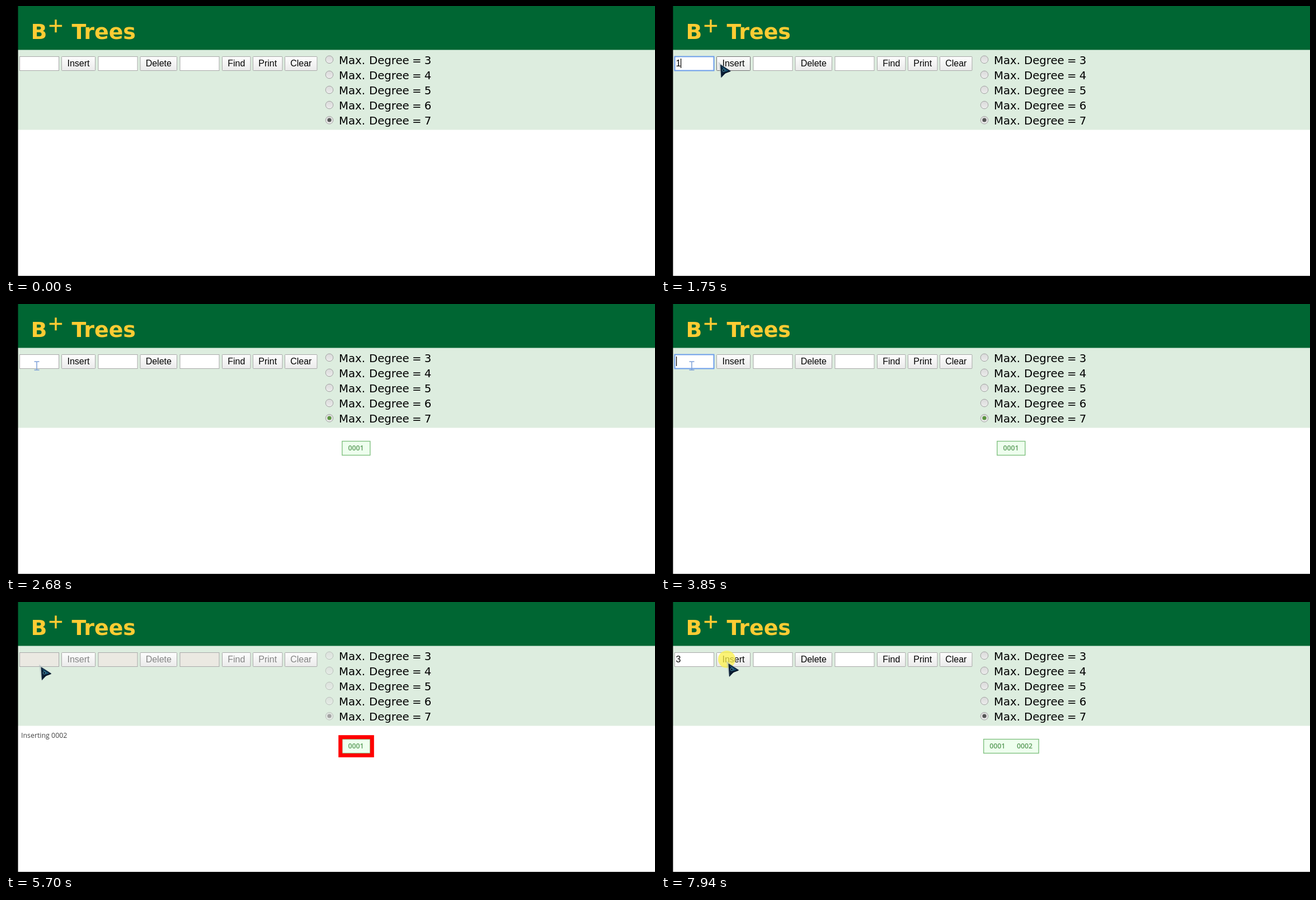
An HTML page for the animation above (8 s loop, 1160x483 px).

```html
<!DOCTYPE html>
<html lang="en">
<head>
<meta charset="utf-8">
<title>B+ Trees</title>
<style>
html, body { margin: 0; width: 100%; height: 100%; overflow: hidden; background: #fff; }
svg { display: block; width: 1160px; height: 483px; }
.title { font: bold 37.9px "DejaVu Sans", sans-serif; fill: #fc3; }
.plus { font: 35px "DejaVu Sans", sans-serif; fill: #fc3; stroke: #fc3; stroke-width: .5; }
.ui { font: 16px "Liberation Sans", Arial, sans-serif; }
.label { font: 19.7px "DejaVu Sans", sans-serif; }
.small { font: 12.4px "Open Sans", sans-serif; fill: #444; }
.key { font: 600 12.3px "Open Sans", sans-serif; fill: #5c9c5c; text-anchor: middle; }
</style>
</head>
<body>
<svg id="stage" viewBox="0 0 1160 483">
  <defs>
    <linearGradient id="face" x2="0" y2="1">
      <stop offset="0" stop-color="#fdfdfd"/><stop offset="1" stop-color="#ebebeb"/>
    </linearGradient>
    <linearGradient id="knob" x2="0" y2="1">
      <stop offset="0" stop-color="#dadada"/><stop offset="1" stop-color="#ececec"/>
    </linearGradient>
  </defs>
  <rect width="1160" height="483" fill="#fff"/>
  <rect y="482" width="1160" height="1" fill="#b4b4b4"/>
  <rect y="78" width="1160" height="143.5" fill="#ddeddf"/>
  <rect width="1160" height="78.5" fill="#063"/>
  <rect width="21.5" height="483" fill="#000"/>
  <text class="title" x="44.6" y="59">B</text>
  <text class="plus" x="74.3" y="46.5">+</text>
  <text class="title" x="117.6" y="59">Trees</text>
  <g id="form"></g>
  <g id="tree">
    <rect id="node" y="245.5" height="25" fill="#efe" stroke="#80c080" stroke-width="1.4"/>
    <text class="key" id="key1" y="261.7">0001</text>
    <text class="key" id="key2" x="650" y="261.7">0002</text>
  </g>
  <rect id="alert" x="597.7" y="241.7" width="56.6" height="32.6" fill="none" stroke="#f00" stroke-width="7"/>
  <text class="small" id="note" x="27" y="243.3"></text>
  <circle id="halo" r="15.5" fill="#fbf04a" fill-opacity=".75"/>
  <g id="arrow">
    <path d="M-1-1L20 14L10 20L3 27Z" fill="#a9b9bd" fill-opacity=".55"/>
    <path d="M2.5 3.5L21.5 15.5L12 19L4 27.5Z" fill="#0b2038"/>
    <path d="M4 6L17 15L11 16.5Z" fill="#155070"/>
    <path d="M5 22L12 18.5L20 15.5" fill="none" stroke="#071426" stroke-width="1.6"/>
    <circle cx="8.5" cy="14" r="2.3" fill="#0a1b33" stroke="#4f93a6" stroke-width="1"/>
  </g>
  <path id="beam" d="M-4.5-7.5H-1Q0-7.5 0-6.5Q0-7.5 1-7.5H4.5M0-6.5V6.5M-4.5 7.5H-1Q0 7.5 0 6.5Q0 7.5 1 7.5H4.5"
        fill="none" stroke="#7b9fd8" stroke-width="1.5"/>
</svg>
<script>
const LOOP = 8000;
const NS = "http://www.w3.org/2000/svg";
const $ = id => document.getElementById(id);

function add(tag, attrs, text) {
  const el = document.createElementNS(NS, tag);
  set(el, attrs);
  if (text) el.textContent = text;
  $("form").appendChild(el);
  return el;
}
function set(el, attrs) {
  for (const k in attrs) el.setAttribute(k, attrs[k]);
}
function show(el, on) {
  el.setAttribute("visibility", on ? "visible" : "hidden");
}

// Form controls
const fields = [24.5, 165, 311].map(x =>
  add("rect", { x, y: 90.5, width: 70, height: 25, "stroke-width": 1 }));
const buttons = [["Insert", 99.5, 60], ["Delete", 240, 65.5], ["Find", 386.5, 50.5],
  ["Print", 441.5, 52.5], ["Clear", 498.5, 57.5]].map(([name, x, width]) => ({
    box: add("rect", { x, y: 90.5, width, height: 25, rx: .8, fill: "url(#face)", stroke: "#a8a8a8" }),
    text: add("text", { class: "ui", x: x + width / 2, y: 107.8, "text-anchor": "middle" }, name)
  }));
const radios = [3, 4, 5, 6, 7].map((n, i) => {
  const y = 27.1 * i;
  [["Max.", 595], ["Degree", 649], ["=", 726], [n, 747.8]].forEach(([s, x]) =>
    add("text", { class: "label", x, y: 104 + y }, String(s)));
  return add("circle", { cx: 578, cy: 95.8 + y, r: 6.8, fill: "url(#knob)", stroke: "#a2a2a2" });
});
const dot = add("circle", { cx: 578, cy: 204, r: 3.6 });
const typed = add("text", { class: "ui", x: 26.6, y: 107.8 });
const caret = add("rect", { y: 94, width: 1.2, height: 17 });

// Bursts of screen updates: first time, last time, count
const bursts = [[270, 1050, 11], [1120, 1370, 4], [1520, 1520, 1], [1750, 1920, 3],
  [2070, 2680, 9], [3770, 3850, 2], [4320, 4620, 5], [4850, 5080, 4], [5460, 5930, 7],
  [6170, 6170, 1], [6470, 6550, 2], [7020, 7020, 1], [7330, 7940, 9]];

function snap(t) {
  let last = 0;
  for (const [a, b, n] of bursts) {
    if (t < a) break;
    const gap = n > 1 ? (b - a) / (n - 1) : 1;
    last = a + Math.min(n - 1, Math.floor((t - a) / gap + 1e-6)) * gap;
  }
  return last;
}

// Pointer: time, x, y, shape from that time on
const path = [
  [270, 855, 426, "arrow"], [430, 675, 332, "arrow"], [600, 480, 248, "arrow"],
  [740, 360, 195, "arrow"], [830, 305, 172, "arrow"], [890, 262, 152, "arrow"],
  [960, 190, 123, "beam"], [1050, 90, 98, "beam"], [1120, 78, 103, "beam"],
  [1290, 78, 103, "beam"], [1370, 84, 104, "beam"], [1670, 84, 104, "beam"],
  [1750, 103.5, 101, "arrow"], [1920, 117, 104, "arrow"], [2370, 117, 104, "arrow"],
  [2520, 78, 108, "beam"], [2680, 55, 110.5, "beam"], [4390, 55, 110.5, "beam"],
  [4460, 92, 108, "beam"], [4540, 106, 107, "arrow"], [4620, 117, 108, "arrow"],
  [5400, 117, 108, "arrow"], [5460, 108, 108, "arrow"], [5690, 60, 113, "arrow"],
  [5930, 62, 106, "arrow"], [6170, 62, 106, "beam"], [7400, 62, 106, "beam"],
  [7480, 82, 106, "beam"], [7550, 102, 106, "arrow"], [7700, 118, 106.5, "arrow"],
  [8000, 118, 106.5, "arrow"]];

function pointer(u) {
  const i = path.findLastIndex(p => p[0] <= u);
  if (i < 0) return null;
  const a = path[i], b = path[i + 1] || a;
  const k = b === a ? 0 : (u - a[0]) / (b[0] - a[0]);
  return { x: a[1] + (b[1] - a[1]) * k, y: a[2] + (b[2] - a[2]) * k, shape: a[3] };
}

const within = (u, spans) => spans.some(([a, b]) => u >= a && u < b);

function draw(t) {
  const u = snap(t);
  const p = pointer(u);
  const focus = within(u, [[1200, 2070], [3770, 4920], [6470, 7930]]);
  const off = within(u, [[2220, 2520], [5070, 6170]]);
  const click = within(u, [[1200, 1360], [2070, 2200], [3770, 3850], [4920, 5070], [6470, 6550], [7930, LOOP]]);
  const blink = within(u, [[1200, 2050], [3770, 4850], [6470, 7020], [7330, 7860]]);
  const value = within(u, [[1520, 2220]]) ? "1" : within(u, [[4320, 5070]]) ? "2" : u >= 7330 ? "3" : "";
  const hover = p && p.shape === "arrow" && p.x >= 100 && p.x <= 159 && p.y < 116 && !off && !click;

  fields.forEach(f => set(f, { fill: off ? "#ebe9e2" : "#fff", stroke: "#a9a9a9", "stroke-width": 1 }));
  if (focus) set(fields[0], { stroke: "#6c9dea", "stroke-width": 2 });
  buttons.forEach(b => b.text.setAttribute("fill", off ? "#848484" : "#000"));
  buttons[0].box.setAttribute("stroke", hover ? "#707070" : "#a8a8a8");
  radios.forEach(r => r.setAttribute("opacity", off ? .6 : 1));
  dot.setAttribute("fill", off ? "#a2a2a2" : within(u, [[2520, 5070]]) ? "#5a9440" : "#555");

  typed.textContent = value;
  show(caret, blink);
  caret.setAttribute("x", value ? 35 : 27);

  const two = u >= 5850;
  show($("node"), u >= 2295);
  set($("node"), two ? { x: 576.7, width: 98.4 } : { x: 600.8, width: 50 });
  show($("key1"), u >= 2295);
  $("key1").setAttribute("x", two ? 601.3 : 625.6);
  show($("key2"), two);
  show($("alert"), within(u, [[5610, 5850]]));
  $("note").textContent = within(u, [[2220, 2450]]) ? "Inserting 0001"
    : within(u, [[5070, 5925]]) ? "Inserting 0002" : "";

  for (const shape of ["arrow", "beam"]) {
    show($(shape), p && p.shape === shape);
    if (p) $(shape).setAttribute("transform", `translate(${p.x} ${p.y})`);
  }
  show($("halo"), click);
  if (p) set($("halo"), { cx: p.x - .5, cy: p.y - (p.shape === "arrow" ? 4 : 2) });
}

const start = performance.now();
function tick() {
  draw((performance.now() - start) % LOOP);
  requestAnimationFrame(tick);
}
draw(0);
requestAnimationFrame(tick);
</script>
</body>
</html>
```
